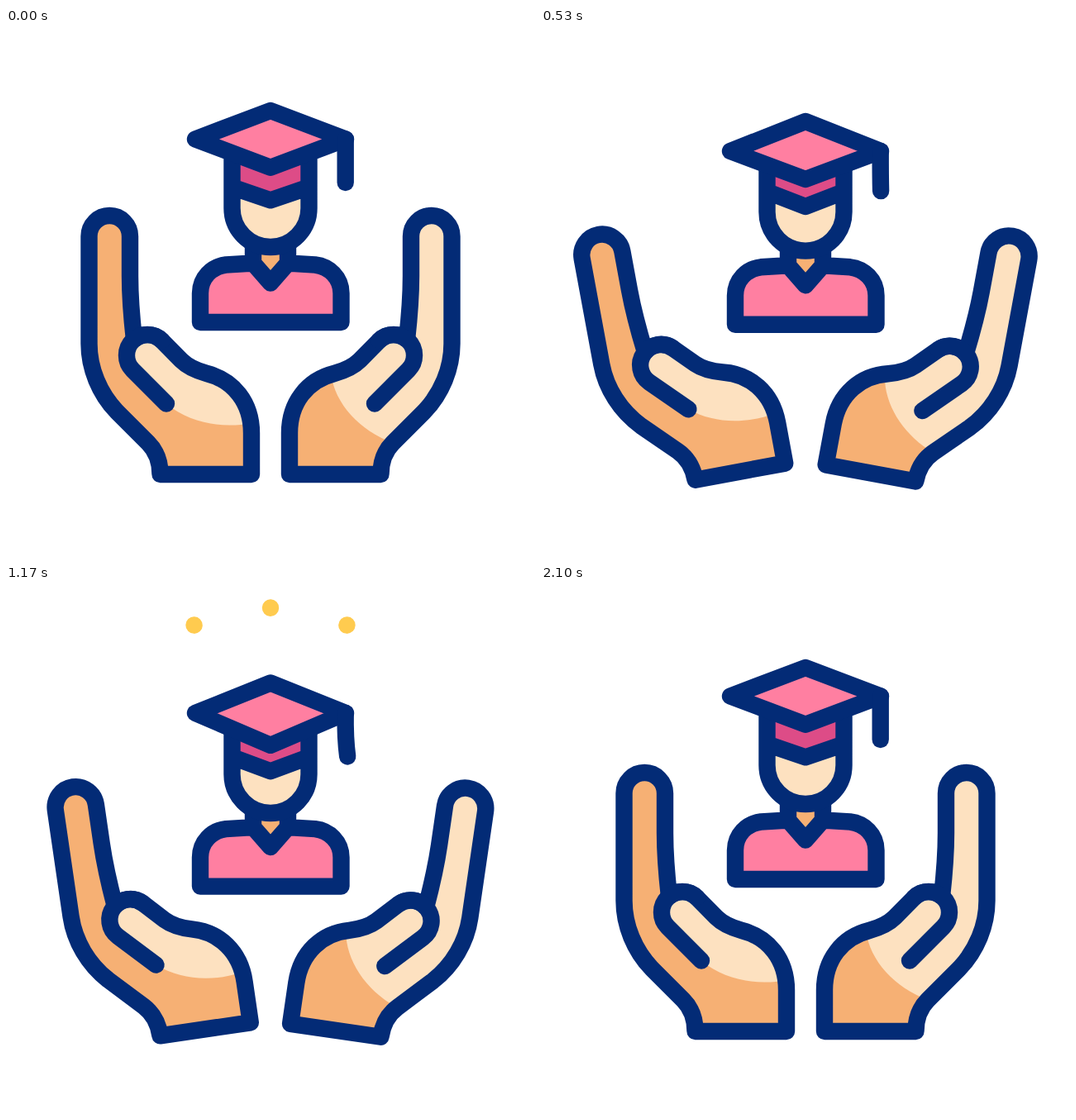
Write an HTML page that moves like this. It is 640 px wide and 640 px high and loops after 2330 ms.

```html
<!DOCTYPE html>
<html lang="en">
<head>
<meta charset="utf-8">
<title>Graduate in caring hands</title>
<style>
  html, body { margin: 0; width: 100%; height: 100%; overflow: hidden; background: #fff; }
  svg { display: block; width: 100%; height: 100%; }
  .ink { fill: none; stroke: #032b76; stroke-width: 20.4; stroke-linecap: round; stroke-linejoin: round; }
  .light { fill: #fde1c0; }
  .dark { fill: #f6b074; }
  .pink { fill: #ff7fa1; }
  .rose { fill: #dd4c87; }
  .ray { stroke: #ffcb4f; stroke-width: 20.4; stroke-linecap: round; }
</style>
</head>
<body>
<svg viewBox="0 0 640 640">
  <defs>
    <path id="hand" d="M186.5 540H297V490C297 453 275 426 243 418C232 415 221 411 212 402L188.7 378.3
      A25 25 0 0 0 155 377C152 350 150 330 150 300V252A24.75 25 0 0 0 100.5 252V382
      C100.5 412 113 442 134 464L172 502C181 511 186.5 524 186.5 540Z"/>
    <path id="thumb" d="M194 454.5L153.3 413.7A25 25 0 0 1 188.7 378.3"/>
  </defs>

  <g id="rays">
    <line class="ray"/><line class="ray"/><line class="ray"/>
  </g>

  <g id="left">
    <use href="#hand" class="dark"/>
    <path class="light" d="M194 454.5L153.3 413.7A25 25 0 0 1 188.7 378.3L212 402C221 411 232 415 243 418
      C272 425 293 449 297 478C262 485 222 478 194 454.5Z"/>
    <use href="#hand" class="ink"/>
    <use href="#thumb" class="ink"/>
  </g>

  <g id="right">
    <g transform="matrix(-1 0 0 1 640 0)">
      <use href="#hand" class="light"/>
      <path class="dark" d="M247 418C242 455 212 487 172 502C181 511 186.5 524 186.5 540H297V490C297 453 277 427 247 418Z"/>
      <use href="#hand" class="ink"/>
      <use href="#thumb" class="ink"/>
    </g>
  </g>

  <g id="body">
    <path class="dark" d="M299 255H341V285L320 308L299 285Z"/>
    <path class="pink" d="M235 356V321C235 302 249 288.5 266 286.5L299 284.5L320 308.5L341 284.5
      L374 286.5C391 288.5 405.5 302 405.5 321V356Z"/>
    <path class="ink" d="M235 356V321C235 302 249 288.5 266 286.5L299 284.5L320 308.5L341 284.5
      L374 286.5C391 288.5 405.5 302 405.5 321V356ZM299 266V286M341 266V286"/>
  </g>

  <path id="face" class="light"/>
  <path id="band" class="rose"/>
  <path id="headInk" class="ink"/>
  <path id="board" class="pink"/>
  <path id="boardInk" class="ink"/>
  <path id="tassel" class="ink"/>
</svg>

<script>
const LOOP = 2330, STEPS = 70;
const $ = id => document.getElementById(id);
const ease = p => (1 - Math.cos(Math.PI * p)) / 2;
const ramp = (t, a, b) => ease(Math.min(1, Math.max(0, (t - a) / (b - a))));
const mix = (a, b, p) => a + (b - a) * p;

// Eased value of a [time, value] table
function track(keys, t) {
  for (let i = 1; i < keys.length; i++) {
    const [t0, a] = keys[i - 1], [t1, b] = keys[i];
    if (t < t1) return mix(a, b, ramp(t, t0, t1));
  }
  return keys[keys.length - 1][1];
}

// Vertical shift of each part at the turning points of the bounce
const BOUNCE = [0, 370, 725, 1170, 1480];
const SHIFT = {
  body:   [0, 20, -19.7, 8.6, 0],
  face:   [0, 25, -22, 11, 0],
  rim:    [0, 33.5, -31, 15.5, 0],
  peak:   [0, 40, -34.5, 17, 0],
  front:  [0, 47, -28.5, 25, 0],
  corner: [0, 39.5, -18, 20.5, 0],
  back:   [0, 32, -12, 18.5, 0]
};
const bounce = {};
for (const part in SHIFT) bounce[part] = BOUNCE.map((t, i) => [t, SHIFT[part][i]]);

const TILT = [[0, 0], [500, 10.45], [770, 11], [1025, 10.45], [1490, 0]];
const SWING = [[0, 0], [370, 8], [725, -9.5], [1170, 2.5], [1430, -4.8],
               [1720, 5], [1920, -2.5], [2090, 0]];
const DROP = [[0, 52.5], [370, 49], [725, 47], [1170, 52.5]];

// Inner x, inner y, outer x, outer y
const RAYS = [[320, 77.5, 320, 27.5], [263, 84, 227.5, 48.5], [377, 84, 412.5, 48.5]];
const rays = [...document.querySelectorAll('.ray')];

function drawRays(t) {
  const head = ramp(t, 750, 1030), tail = ramp(t, 845, 1180);
  $('rays').style.display = t > 750 && t < 1190 ? '' : 'none';
  RAYS.forEach(([x0, y0, x1, y1], i) => {
    const ends = { x1: mix(x0, x1, tail), y1: mix(y0, y1, tail),
                   x2: mix(x0, x1, head) + 0.01, y2: mix(y0, y1, head) };
    for (const k in ends) rays[i].setAttribute(k, ends[k]);
  });
}

function draw(t) {
  const dy = part => track(bounce[part], t);
  const path = (id, d) => $(id).setAttribute('d', d);

  const tilt = track(TILT, t);
  $('left').setAttribute('transform', `rotate(${-tilt} 223 543)`);
  $('right').setAttribute('transform', `rotate(${tilt} 407 543)`);
  $('body').setAttribute('transform', `translate(0 ${dy('body')})`);

  const back = 100 + dy('back'), corner = 134.5 + dy('corner'), front = 168.8 + dy('front');
  const brow = mix(corner, front, 0.5);
  const jaw = 218 + dy('face'), rim = 192.5 + dy('rim'), peak = 208.3 + dy('peak');

  const head = `M273.5 ${brow}V${jaw}A46.5 47 0 0 0 366.5 ${jaw}V${brow}`;
  const chevron = `M273.5 ${rim}L320 ${peak}L366.5 ${rim}`;
  path('face', head + 'Z');
  path('band', `${chevron}V${brow}H273.5Z`);
  path('headInk', head + chevron);

  const board = `M229 ${corner}L320 ${back}L411 ${corner}L320 ${front}Z`;
  path('board', board);
  path('boardInk', board);

  const swing = track(SWING, t);
  path('tassel', `M410.7 ${corner}Q${410.7 - swing * 0.2} ${corner + 30} ${410.7 + swing} ${corner + track(DROP, t)}`);

  drawRays(t);
}

const start = performance.now();
function tick() {
  const t = (performance.now() - start) % LOOP;
  const step = LOOP / STEPS;
  draw(Math.floor((t + 4) / step) % STEPS * step);
  requestAnimationFrame(tick);
}
tick();
</script>
</body>
</html>
```
